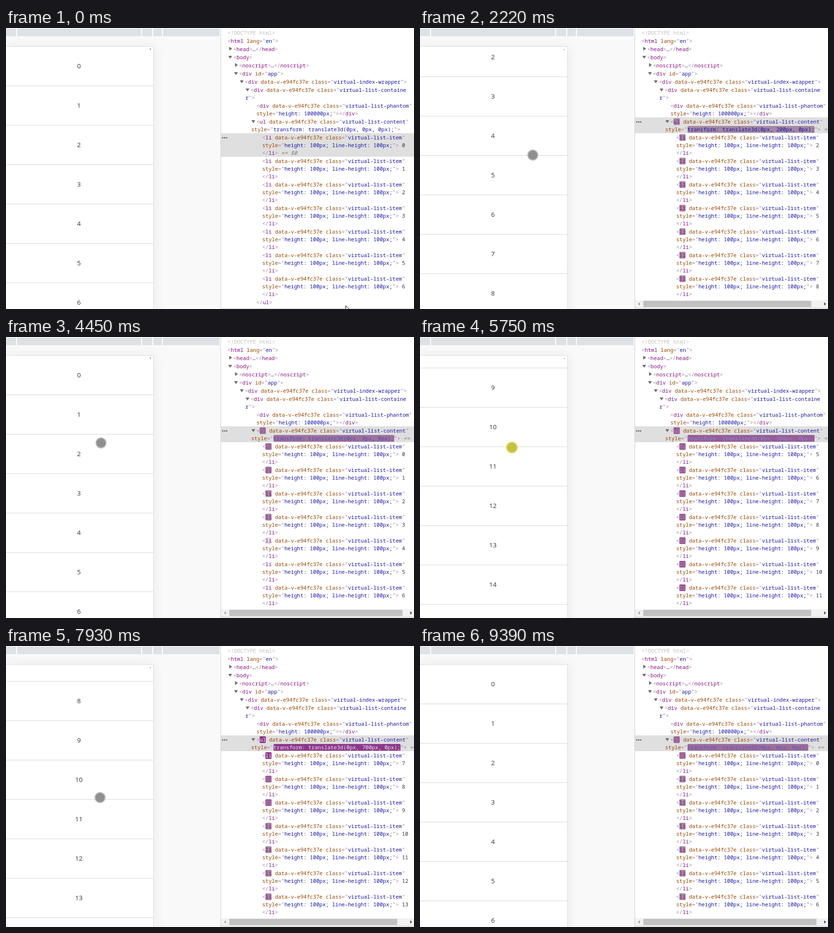
Animation of 848x585 px, one loop 9460 ms. Source, as an HTML page:

```html
<!DOCTYPE html>
<html lang="en">
<head>
<meta charset="utf-8">
<title>Virtual list</title>
<style>
  html, body { margin: 0; width: 100%; height: 100%; overflow: hidden; background: #fff; }
  #stage { position: relative; width: 848px; height: 585px; overflow: hidden; background: #f9f9f9; }
  #stage div, #stage svg { position: absolute; box-sizing: border-box; }

  #toolbar { left: 0; top: 0; width: 446px; height: 17px; background: #fff; }
  .tab { top: 1px; height: 16px; background: #dee1e6; }
  #phone, #shade { left: -1px; top: 38px; width: 308px; height: 600px; }
  #phone { overflow: hidden; border: 1px solid #dcdddd; background: #fff; }
  #shade { box-shadow: 0 2px 24px rgba(0, 30, 20, .07); }
  .item { left: 0; width: 306px; height: 82px; padding-right: 3px; border-bottom: 1px solid #d6d6d6;
    font: 13.5px/81px "Open Sans", "Noto Sans", sans-serif; text-align: center; color: #333; }
  #bar { left: 299px; width: 2px; background: #a8a8a8; }

  #panel { left: 446px; top: 0; width: 402px; height: 585px; border-left: 1px solid #cdcdcd; background: #fff; }
  #row { left: 447px; width: 401px; background: #dfdfdf; }
  #dots { left: 449px; width: 3px; height: 3px; border-radius: 50%; background: #6a6a6a;
    box-shadow: 4px 0 #6a6a6a, 8px 0 #6a6a6a; }
  .line { height: 16px; white-space: pre; color: #303942;
    font: 11px/16px "Noto Sans Mono", "DejaVu Sans Mono", monospace; }
  .line b { font-weight: 400; color: #99829a; }
  .line u { color: #881280; }
  .line s { color: #994500; }
  .line q { quotes: none; color: #1a1aa6; }
  .line u, .line s { text-decoration: none; }
  .line u, .line q { display: inline-block; vertical-align: top; margin: 1px 0; line-height: 14px; border-radius: 2px; }
  .line i { color: #777; }
  .grey { color: #c0c0c0; }
  .open, .shut { background: #6e6e6e; }
  .open { width: 8px; height: 6px; margin: -3px -4px; clip-path: polygon(0 0, 100% 0, 50% 100%); }
  .shut { width: 6px; height: 8px; margin: -5px -2px; clip-path: polygon(0 0, 100% 50%, 0 100%); }

  #hscroll { left: 447px; top: 567px; width: 401px; height: 16px; background: #f1f1f1; }
  #thumb { left: 17px; top: 1px; height: 13px; background: #c1c1c1; }
  .end { top: 4px; width: 4px; height: 7px; }
  .end.l { left: 6px; background: #a3a3a3; clip-path: polygon(100% 0, 0 50%, 100% 100%); }
  .end.r { left: 393px; background: #505050; clip-path: polygon(0 0, 100% 50%, 0 100%); }
  #foot { left: 447px; top: 583px; width: 401px; height: 1px; background: #c6c6c6; }

  #touch { width: 23px; height: 23px; margin: -11px; border-radius: 50%; border: 2px solid #bfbfbf; background: #8f8f8f; }
  #touch.down { width: 24px; height: 24px; margin: -12px; border-color: #dcdb5d; background: #c3c245; }
</style>
</head>
<body>
<div id="stage">
  <div id="toolbar"></div>
  <div id="shade"></div>
  <div id="phone"></div>
  <div id="bar"></div>
  <div id="panel"></div>
  <div id="row"></div>
  <div id="dots"></div>
  <div id="tree"></div>
  <div id="hscroll"><div class="end l"></div><div id="thumb"></div><div class="end r"></div></div>
  <div id="foot"></div>
  <div id="touch"></div>
  <svg id="arrow" width="14" height="20"><path d="M1 1V15L4.3 12L6.5 17.5L8.8 16.5L6.5 11.3H11Z" fill="#fff" stroke="#000"/></svg>
</div>
<script>
const LOOP = 9460, STEP = 1000 / 13, LAST = 122, ITEM = 82, COUNT = 7;
const REFRESH_START = 970, REFRESH = 275, TRAVEL = 240;
const $ = id => document.getElementById(id);
const clamp = v => Math.max(0, Math.min(1, v));
const lerp = (a, b, f) => a + (b - a) * f;
const flick = p => Math.sin(p * Math.PI / 2);
const drag = p => p * p * (3 - 2 * p);

// One swipe: when, how long, list offset reached, where the finger goes.
const swipe = (start, length, to, x, y0, y1, ease = flick) => ({ start, length, to, x, y0, y1, ease });
const SWIPES = [
  swipe(620, 1100, 183, 234, 440, 263),
  swipe(2450, 600, 498, 242, 430, 116),
  swipe(3085, 1100, 0, 197, 116, 220, drag),
  swipe(4700, 600, 386, 191, 450, 180),
  swipe(5300, 600, 772, 191, 450, 180),
  swipe(5900, 600, 1159, 191, 500, 265),
  swipe(6850, 1200, 612, 195, 265, 316),
  swipe(8400, 500, 0, 195, 316, 470),
];
const progress = (s, t) => clamp((t - s.start) / s.length);

function offsetAt(t) {
  return Math.round(SWIPES.reduce((y, s) => lerp(y, s.to, s.ease(progress(s, t))), 0));
}

function pointerAt(t) {
  let x = 705, y = 577, down = false;
  for (const s of SWIPES) {
    const first = s === SWIPES[0], p = progress(s, t), e = s.ease(p);
    const go = drag(clamp((t - s.start + TRAVEL) / TRAVEL));
    x = lerp(x, s.x, first ? go : e);
    y = lerp(lerp(y, s.y0, go), s.y1, e);
    down = down || (p > 0 && p < .8);
  }
  const leave = clamp((t - 8900) / 80);
  return { x: Math.round(x), y: Math.round(lerp(y, 610, leave)), down };
}

// The tree refreshes on a slow beat, and twice as often while rows are added in front.
function treeAt(t) {
  let first = 0, changed = -Infinity, born = Array(COUNT).fill(changed);
  for (let k = 0; REFRESH_START + k * REFRESH <= t; k++) {
    const time = REFRESH_START + k * REFRESH, next = Math.floor(offsetAt(time) / ITEM);
    if (next === first || (next > first && k % 2)) continue;
    const added = next > first ? COUNT : first - next, old = born;
    born = old.map((_, i) => i < added ? time : old[i - added]);
    first = next;
    changed = time;
  }
  return { first, changed, born };
}

// Highlight of a changed part: strong purple, then mauve, then gone.
const TAG = [136, 18, 128], VALUE = [26, 26, 166], FRESH = [138, 44, 135], STALE = [164, 135, 163];
function flash(age, ink) {
  const alpha = clamp((1050 - age) / 150), f = clamp(age / 600);
  if (!alpha) return '';
  const fill = FRESH.map((c, i) => lerp(c, STALE[i], f));
  return `background:rgba(${fill},${alpha});color:rgb(${ink.map(c => lerp(255, c, f))})`;
}

// Colours one line of markup.
function paint(src, tagCss = '', valueCss = '', quoted = false) {
  let inTag = true;
  return [...src.matchAll(/<\/?[a-z]+|="|"|>|[^<>"=]+/g)].map(([s]) => {
    if (s[0] === '<') {
      inTag = true;
      return `<b>&lt;${s[1] === '/' ? '/' : ''}</b><u style="${tagCss}">${s.replace(/\W/g, '')}</u>`;
    }
    if (s === '="' || s === '"') { quoted = s === '="'; return `<b>${s}</b>`; }
    if (s === '>') { inTag = false; return '<b>&gt;</b>'; }
    if (quoted) return `<q style="${valueCss}">${s}</q>`;
    return inTag ? `<s>${s}</s>` : s;
  }).join('');
}

// Rows of [depth, marker, ...lines]; wrapped lines sit one pixel closer.
function layout(rows) {
  let y = -7, html = '';
  for (const [depth, marker, ...lines] of rows) {
    const x = 460.5 + depth * 12;
    lines.forEach((text, i) => {
      y += i ? 16 : 17;
      html += `<div class="line" style="left:${i && marker ? x - 11 : x}px;top:${y - 8}px">${text}</div>`;
      if (marker && !i) html += `<div class="${marker}" style="left:${x - 6.5}px;top:${y}px"></div>`;
    });
  }
  return html;
}

const ID = 'data-v-e94fc37e class=';
const SELF = '<i> == $0</i>';
const HEAD = [
  [0, '', '<span class="grey">&lt;!DOCTYPE html&gt;</span>'],
  [0, '', paint('<html lang="en">')],
  [1, 'shut', paint('<head>…</head>')],
  [1, 'open', paint('<body>')],
  [2, 'shut', paint('<noscript>…</noscript>')],
  [2, 'open', paint('<div id="app">')],
  [3, 'open', paint(`<div ${ID}"virtual-index-wrapper">`)],
  [4, 'open', paint(`<div ${ID}"virtual-list-containe`), paint('r">', '', '', true)],
  [5, '', paint(`<div ${ID}"virtual-list-phantom"`), paint('style="height: 100000px;"></div>')],
];

function drawTree(t) {
  const { first, changed, born } = treeAt(t), moved = changed > 0, age = t - changed;
  const shift = first * 100;
  const list = [5, 'open',
    paint(`<ul ${ID}"virtual-list-content"`, flash(age, TAG)),
    paint(`style="transform: translate3d(0px, ${shift}px, 0px);">`, '', flash(age, VALUE)) + (moved ? SELF : '')];
  const items = born.map((time, i) => [6, '',
    paint(`<li ${ID}"virtual-list-item"`, flash(t - time, TAG)),
    paint(`style="height: 100px; line-height: 100px;"> ${first + i}`),
    paint('</li>') + (moved || i ? '' : SELF)]);
  $('tree').innerHTML = layout([...HEAD, list, ...items, [5, '', paint('</ul>')]]);

  const top = moved ? 186 : 219;
  $('row').style.top = top + 'px';
  $('row').style.height = (moved ? 33 : 49) + 'px';
  $('dots').style.top = top + 8 + 'px';
  $('hscroll').style.display = moved ? 'block' : 'none';
  const content = 408.8 + 6.6 * (String(shift).length - 1);
  $('thumb').style.width = Math.round(367 * 401 / content) + 'px';
}

function drawList(t) {
  const y = offsetAt(t), start = Math.floor(Math.min(y, offsetAt(t - STEP)) / ITEM);
  $('phone').innerHTML = Array.from({ length: COUNT }, (_, i) => start + i)
    .map(n => `<div class="item" style="top:${n * ITEM - y}px">${n}</div>`).join('');
  const bar = $('bar').style;
  bar.top = (y ? 44 : 42) + 'px';
  bar.height = (y ? 2 : 4) + 'px';
  bar.opacity = clamp((9370 - t) / 310);
}

function drawPointer(t) {
  const { x, y, down } = pointerAt(t), touching = x < 444;
  $('touch').className = down ? 'down' : '';
  for (const [id, on] of [['touch', touching], ['arrow', !touching]]) {
    Object.assign($(id).style, { display: on ? 'block' : 'none', left: x + 'px', top: y + 'px' });
  }
}

const GAPS = [-2, 21, 281, 304, 324, 444];
$('toolbar').innerHTML = GAPS.slice(1)
  .map((end, i) => `<div class="tab" style="left:${GAPS[i] + 2}px;width:${end - GAPS[i] - 2}px"></div>`).join('');

let shown = -1;
function draw(now) {
  const step = Math.min(LAST, Math.floor((now % LOOP + 14) / STEP));
  if (step === shown) return;
  shown = step;
  const t = Math.max(0, step * STEP - 8);
  drawTree(t);
  drawList(t);
  drawPointer(t);
}

const began = performance.now();
function tick() {
  draw(performance.now() - began);
  requestAnimationFrame(tick);
}
tick();
</script>
</body>
</html>
```
